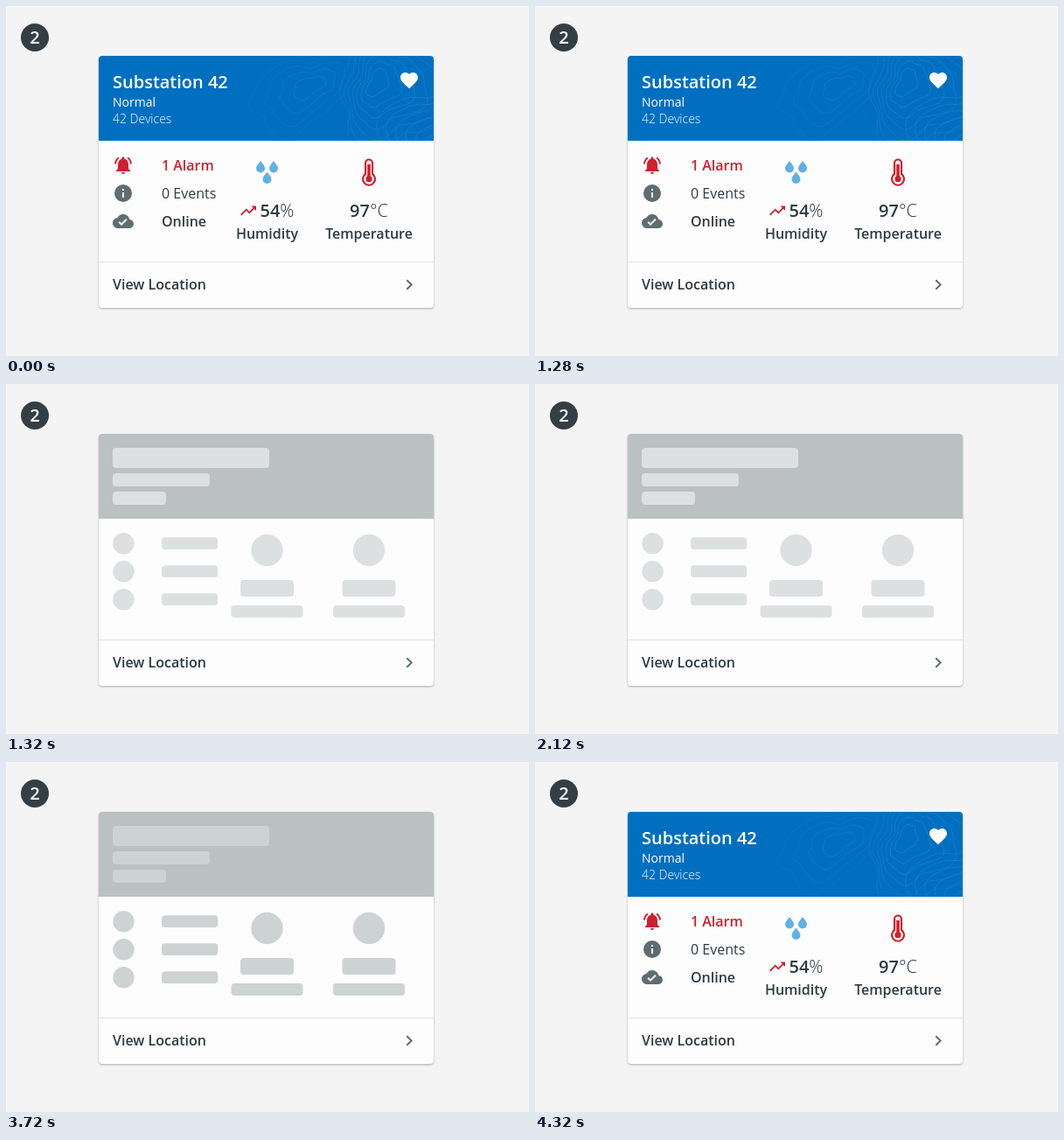
These frames come from a looping animation (598 px wide and 400 px high, 4360 ms). An HTML page:

```html
<!DOCTYPE html>
<html lang="en">
<head>
<meta charset="utf-8">
<style>
  html, body { margin: 0; width: 100%; height: 100%; overflow: hidden; background: #f4f4f4; }
  svg { display: block; font: 600 16px "Open Sans", sans-serif; fill: #2c3a43; }
  .card { fill: #fdfdfd; filter: drop-shadow(0 1px 1.2px rgba(0, 0, 0, .3)); }
  .big { font-size: 20px; }
  .small { font-size: 14px; }
  .regular { font-weight: 400; }
  .light { font-weight: 300; }
  .mid { text-anchor: middle; }
  .red { fill: #d01f2e; }
  .gray { fill: #5f6d72; }
  .white { fill: #fff; }
  #contours { fill: none; stroke: #4aa0dc; stroke-width: .8; }
</style>
</head>
<body>
<svg width="598" height="400" viewBox="0 0 598 400">
  <defs>
    <path id="header" d="M106 154V61a4 4 0 0 1 4-4H485a4 4 0 0 1 4 4V154z"/>
    <path id="drop" d="M0-6.5C2 -3.5 5-1 5 2A5 5 0 0 1-5 2C-5-1-2-3.5 0-6.5z"/>
    <clipPath id="headerClip"><use href="#header"/></clipPath>
  </defs>

  <circle cx="33" cy="36" r="16" fill="#333f45"/>
  <text class="big white mid" x="33" y="43">2</text>
  <rect class="card" x="106" y="57" width="383" height="288" rx="4"/>
  <path d="M106 292.5H489" stroke="#e1e5e6"/>
  <text x="122" y="324">View Location</text>
  <path class="gray" transform="translate(449 306.5)" d="M10 6L8.59 7.41 13.17 12l-4.58 4.59L10 18l6-6z"/>

  <g id="loaded">
    <use href="#header" fill="#006fbf"/>
    <g id="contours" clip-path="url(#headerClip)"></g>
    <g class="white">
      <text class="big" x="122" y="94">Substation 42</text>
      <text class="small regular" x="122" y="115">Normal</text>
      <text class="small light" x="122" y="134">42 Devices</text>
      <path transform="translate(449 73)" d="M12 21.35l-1.45-1.32C5.4 15.36 2 12.28 2 8.5 2 5.42 4.42 3 7.5 3c1.74 0 3.41.81 4.5 2.09C13.09 3.81 14.76 3 16.5 3 19.58 3 22 5.42 22 8.5c0 3.78-3.4 6.86-8.55 11.54z"/>
    </g>

    <path class="red" transform="translate(122 170)" d="M7.58 4.08L6.15 2.65C3.75 4.48 2.17 7.3 2.03 10.5h2c.15-2.65 1.51-4.97 3.55-6.42zm12.39 6.42h2c-.15-3.2-1.73-6.02-4.12-7.85l-1.42 1.43c2.02 1.45 3.39 3.77 3.54 6.42zM18 11c0-3.07-1.64-5.64-4.5-6.32V4c0-.83-.67-1.5-1.5-1.5s-1.5.67-1.5 1.5v.68C7.63 5.36 6 7.92 6 11v5l-2 2v1h16v-1l-2-2zm-6 11c1.1 0 2-.9 2-2h-4c0 1.1.9 2 2 2z"/>
    <path class="gray" transform="translate(122 202)" d="M12 2a10 10 0 1 0 0 20 10 10 0 0 0 0-20zm1 15h-2v-6h2zm0-8h-2V7h2z"/>
    <path class="gray" transform="translate(122 234)" d="M19.35 10.04C18.67 6.59 15.64 4 12 4 9.11 4 6.6 5.64 5.35 8.04 2.34 8.36 0 10.91 0 14c0 3.31 2.69 6 6 6h13c2.76 0 5-2.24 5-5 0-2.64-2.05-4.78-4.65-4.96zM10 17l-3.5-3.5 1.41-1.41L10 14.17 15.18 9l1.41 1.41z"/>
    <text class="red" x="178" y="188">1 Alarm</text>
    <text class="regular" x="178" y="220">0 Events</text>
    <text x="178" y="252">Online</text>

    <g fill="#5fb1e1">
      <use href="#drop" x="291" y="183.5"/>
      <use href="#drop" x="306" y="183.5"/>
      <use href="#drop" x="298.5" y="196"/>
    </g>
    <path class="red" transform="translate(266.2 223.2) scale(.9)" d="M16 6l2.29 2.29-4.88 4.88-4-4L2 16.59 3.41 18l6-6 4 4 6.3-6.29L22 12V6z"/>
    <text class="big" x="290.5" y="241">54<tspan class="light">%</tspan></text>
    <text class="mid" x="298.5" y="266">Humidity</text>

    <path d="M411 192V179.5a4 4 0 0 1 8 0V192a7 7 0 1 1-8 0z" fill="#fdfdfd" stroke="#d01f2e" stroke-width="2.2"/>
    <path d="M415 181V197" stroke="#d01f2e" stroke-width="3.6"/>
    <circle class="red" cx="415" cy="197.7" r="3.6"/>
    <text class="big mid" x="415" y="241">97<tspan class="light">°C</tspan></text>
    <text class="mid" x="415" y="266">Temperature</text>
  </g>

  <g id="skeleton">
    <use href="#header" fill="#bbc1c1"/>
    <g id="bones"></g>
  </g>
</svg>
<script>
  const $ = id => document.getElementById(id);
  const LOOP = 4360, LOADING = 1320, LOADED = 4320;

  // Wobbly closed line around a centre, tilted like a map contour
  function contour(cx, cy, rx, ry, tilt, seed, opacity) {
    const points = [];
    for (let i = 0; i < 72; i++) {
      const a = i / 72 * 2 * Math.PI;
      const r = 1 + .13 * Math.sin(3 * a + seed) + .07 * Math.sin(5 * a - seed * 2) + .03 * Math.sin(9 * a + seed);
      const x = rx * r * Math.cos(a), y = ry * r * Math.sin(a);
      points.push((cx + x * Math.cos(tilt) - y * Math.sin(tilt)).toFixed(1) + ' ' +
                  (cy + x * Math.sin(tilt) + y * Math.cos(tilt)).toFixed(1));
    }
    return `<path opacity="${opacity}" d="M${points.join('L')}z"/>`;
  }

  let lines = '';
  for (let i = 0; i < 4; i++) lines += contour(346 - i * 3, 93 + i * 2, 20 + i * 14, 10 + i * 9, -.5, 1 + i * .2, .27 - i * .04);
  for (let i = 0; i < 7; i++) lines += contour(425 + i * 4, 88 + i * 2, 10 + i * 10, 17 + i * 9, .5, 2 + i * .16, .42 - i * .03);
  for (let i = 0; i < 6; i++) lines += contour(496, 160, 14 + i * 10, 18 + i * 11, .3, 4 + i * .1, .32);
  $('contours').innerHTML = lines;

  const bar = (x, y, w, h) => `<rect x="${x}" y="${y}" width="${w}" height="${h}" rx="4"/>`;
  const dot = (x, y, r) => `<circle cx="${x}" cy="${y}" r="${r}"/>`;
  let bones = bar(122, 73, 179, 23) + bar(122, 102, 111, 15) + bar(122, 123, 61, 15);
  for (const y of [182, 214, 246]) bones += dot(134.5, y + .3, 12.2) + bar(178, y - 6.7, 64.3, 13.7);
  for (const x of [298.5, 415]) bones += dot(x, 190, 18.2) + bar(x - 30.5, 224, 61, 19) + bar(x - 41, 253, 82, 14);
  $('bones').innerHTML = bones;

  function draw(now) {
    const t = now % LOOP;
    const loading = t >= LOADING && t < LOADED;
    $('loaded').style.display = loading ? 'none' : '';
    $('skeleton').style.display = loading ? '' : 'none';
    $('bones').setAttribute('fill', t < 3720 ? '#dce0e1' : t < 4120 ? '#cdd2d2' : '#dae0de');
  }

  const start = performance.now();
  function tick() {
    draw(performance.now() - start);
    requestAnimationFrame(tick);
  }
  tick();
</script>
</body>
</html>
```
